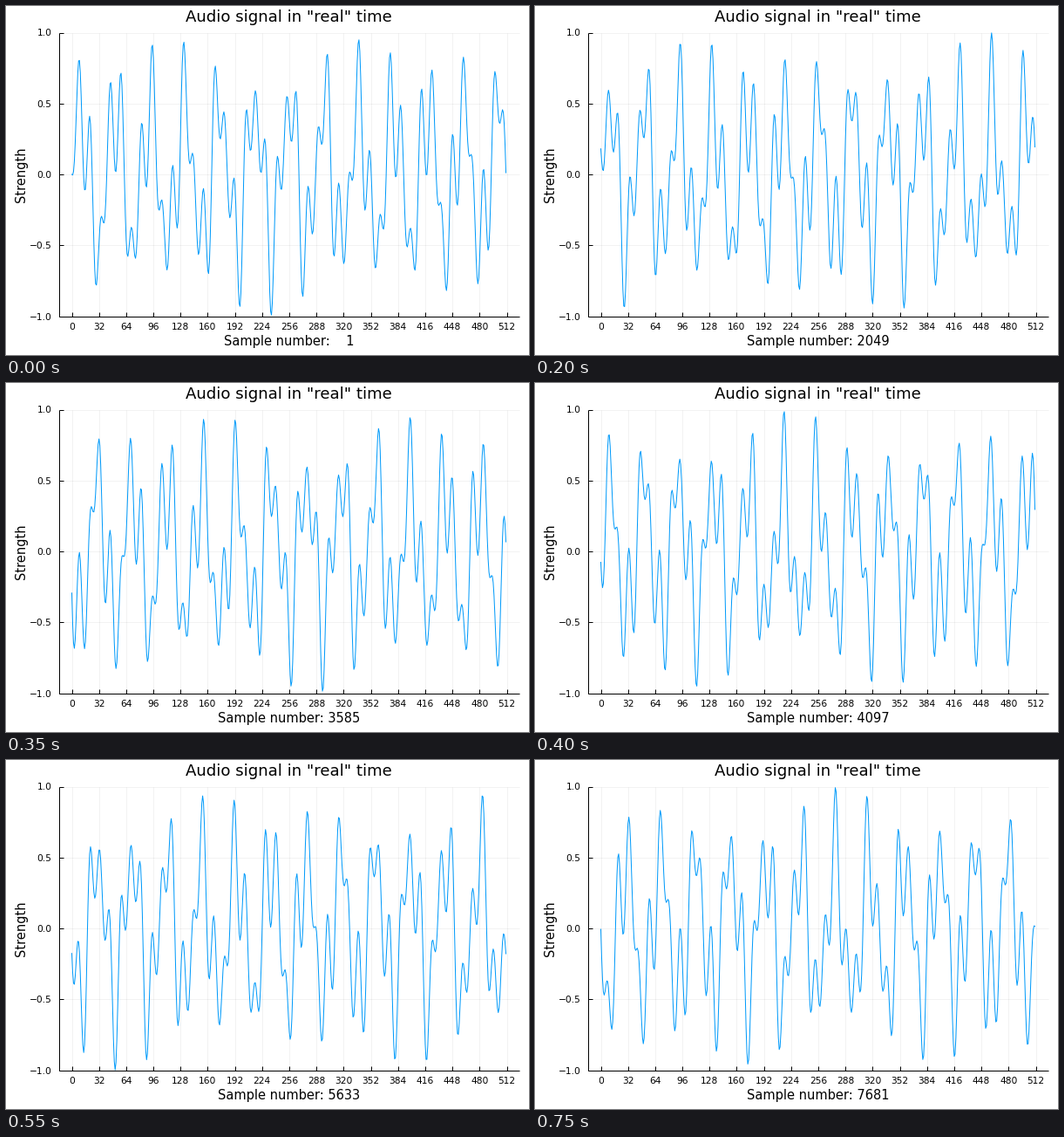
Animation, 600 px wide and 400 px high, one loop 800 ms. Source, as a matplotlib script:

```python
import numpy as np
import matplotlib.pyplot as plt
from matplotlib.animation import FuncAnimation

W, H, DPI = 600, 400, 100
FRAMES, INTERVAL = 16, 50
BLOCK = 512

LEFT, RIGHT, TOP, BOTTOM = 60.5, 588.5, 30.5, 355.5
# (amplitude, cycles per block) of each partial
PARTIALS = [(0.5, 12.5015), (-0.3, 42.005), (0.2, 27.8165)]

plt.rcParams["font.family"] = "DejaVu Sans"


def pt(px):
    return px * 72 / DPI


def to_x(sample):
    return 75.5 + sample * 499 / BLOCK


def to_y(value):
    return (TOP + BOTTOM) / 2 - value * (BOTTOM - TOP) / 2


def signal(n):
    return sum(a * np.sin(2 * np.pi * f * n / BLOCK) for a, f in PARTIALS)


fig = plt.figure(figsize=(W / DPI, H / DPI), dpi=DPI, facecolor="white")
ax = fig.add_axes([0, 0, 1, 1])
ax.set_xlim(0, W)
ax.set_ylim(H, 0)
ax.axis("off")


def rule(x0, y0, x1, y1, width=1.0, alpha=1.0, z=3):
    ax.plot([x0, x1], [y0, y1], color="black", lw=pt(width), alpha=alpha,
            solid_capstyle="butt", zorder=z)


def label(x, y, text, size, ha="center", **kw):
    return ax.text(x, y, text, fontsize=pt(size), color="black",
                   ha=ha, va="baseline", **kw)


for s in range(0, BLOCK + 1, 32):
    x = to_x(s)
    rule(x, TOP, x, BOTTOM, 0.5, 0.1, 1)
    rule(x, BOTTOM, x, BOTTOM - 5)
    label(x, 371, str(s), 10.67)

for v in (-1.0, -0.5, 0.0, 0.5, 1.0):
    y = to_y(v)
    rule(LEFT, y, RIGHT, y, 0.5, 0.1, 1)
    rule(LEFT, y, LEFT + 5, y)
    label(52.5, y + 4, f"{v:.1f}".replace("-", "\u2212"), 10.67, ha="right")

rule(LEFT, TOP, LEFT, BOTTOM + 0.5)
rule(LEFT, BOTTOM, RIGHT, BOTTOM)

center = (LEFT + RIGHT) / 2
label(center, 18, 'Audio signal in "real" time', 18.1)
label(21.5, 193, "Strength", 14.67, rotation=90, rotation_mode="anchor")
counter = label(center, 389, "", 14.67)

samples = np.arange(BLOCK)
wave, = ax.plot(to_x(samples), to_y(signal(samples)), color="#009AFA",
                lw=pt(1), solid_joinstyle="round", zorder=4)


def update(i):
    start = i * BLOCK
    wave.set_ydata(to_y(signal(start + samples)))
    counter.set_text(f"Sample number: {start + 1:4d}")
    return wave, counter


anim = FuncAnimation(fig, update, frames=FRAMES, interval=INTERVAL,
                     repeat=True, repeat_delay=0)
plt.show()
```
